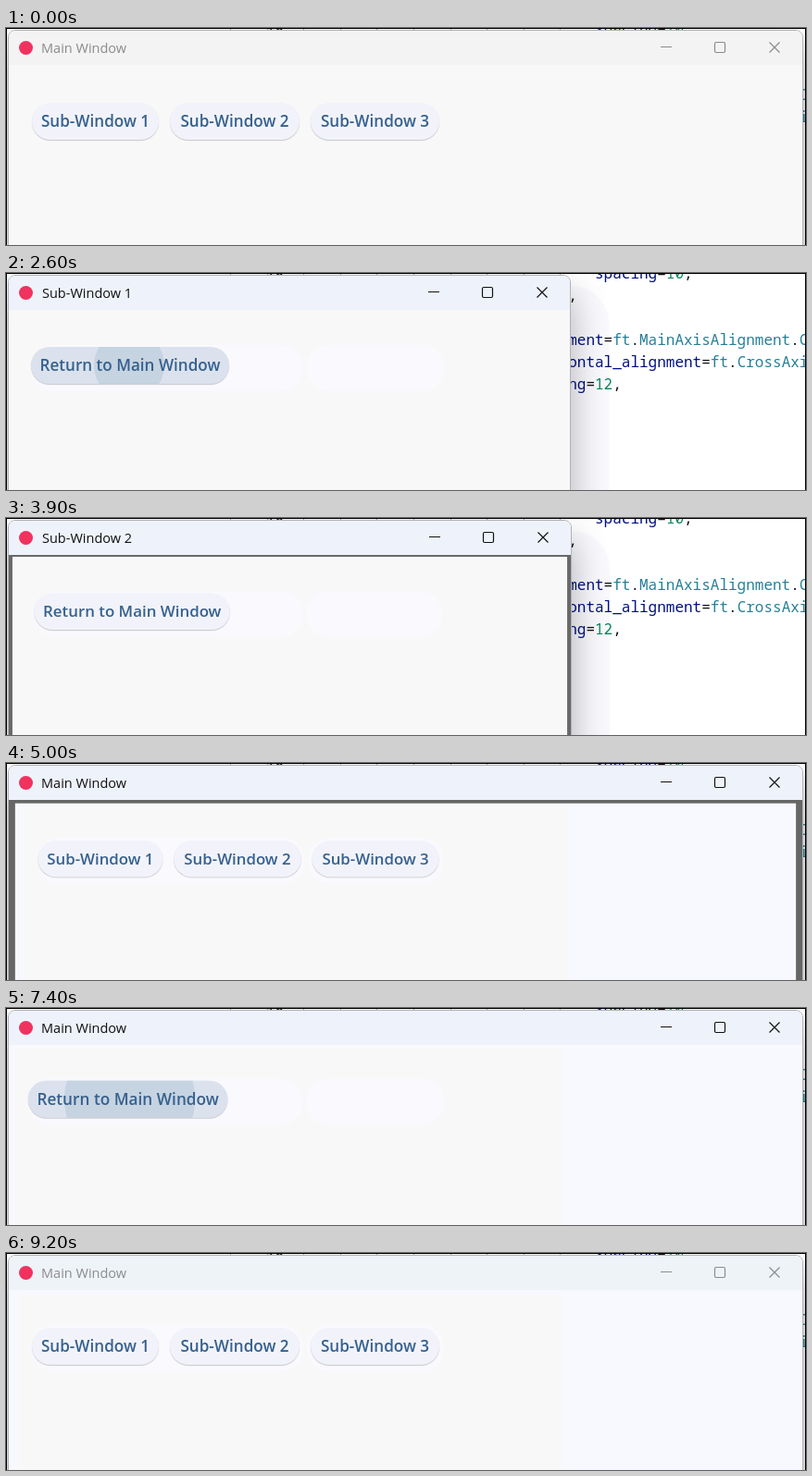
These frames come from a looping animation (864x235 px, 9.3 s). An HTML page:

```html
<!DOCTYPE html>
<html lang="en">
<head>
<meta charset="utf-8">
<title>Window navigation</title>
<style>
  html, body { margin: 0; width: 100%; height: 100%; overflow: hidden; }
  #stage { position: relative; width: 864px; height: 235px; overflow: hidden; background: #fff; }
  #stage * { position: absolute; box-sizing: border-box; white-space: pre; }
  #stage .edge { inset: 0; border: solid #000; border-width: 1px 1px 0; }

  .code { left: 607.2px; font: 16px/24px "Noto Sans Mono", monospace; color: #111; }
  #stage .code * { position: static; }
  .code b { font-weight: 400; color: #001080; }
  .code i { font-style: normal; color: #267f99; }
  .code u { text-decoration: none; color: #098658; }
  .guides { left: 242px; top: 1px; width: 360px; height: 1px;
    background: repeating-linear-gradient(90deg, #aaa 0 1px, transparent 1px 39.6px); }

  #halo { top: 14px; height: 420px; border-radius: 40px; background: #fafafe; }
  #win { left: 2px; top: 2px; height: 420px; border: 1px solid #b2b3b6; border-radius: 8px;
    overflow: hidden; box-shadow: 0 20px 40px rgba(0, 0, 0, .3); }
  #bar { inset: 0 0 auto; height: 37px; }
  .logo { left: 11px; top: 11px; width: 15px; height: 15px; border-radius: 50%; background: #f0325f; }
  #title { top: 0; font: 14.5px/37px "Open Sans", sans-serif; }
  #controls { right: 0; top: 0; }
  #view { inset: 37px 0 0; overflow: hidden; }
  #page { inset: 0; overflow: hidden; }
  #patch { left: 10px; top: 5px; height: 400px; background: #f8f8f8; }
  .ghost { top: 38px; height: 50px; border-radius: 24px; background: #f9f9fe; }

  .btn { height: 40px; border-radius: 20px; overflow: hidden; background: #f2f3fa; color: #36618e;
    text-align: center; font: 600 17.1px/40px "Open Sans", sans-serif;
    box-shadow: 0 1px 1px rgba(0, 0, 0, .2); }
  .btn .heat { inset: 0; background: #36618e; }
  .btn .ripple { border-radius: 50%; background: rgba(54, 97, 142, .12); }
  .btn .label { inset: 0; }
</style>
</head>
<body>
<div id="stage">
  <div id="halo"></div>
  <div class="code" style="left:281px;top:-15px">10</div>
  <div class="code" style="left:636px;top:-12px"><b>spacing</b>=<u>10</u>,</div>
  <div class="code" style="top:12px">,</div>
  <div class="code" style="top:60px"><b>ment</b>=<i>ft</i>.<i>MainAxisAlignment</i>.<i>C</i></div>
  <div class="code" style="top:84px"><b>ontal_alignment</b>=<i>ft</i>.<i>CrossAxi</i></div>
  <div class="code" style="top:108px"><b>ng</b>=<u>12</u>,</div>
  <div class="guides"></div>
  <div id="win">
    <div id="bar">
      <div class="logo"></div>
      <div id="title"></div>
      <svg id="controls" width="174" height="37" fill="none" stroke="currentColor" stroke-width="1.2">
        <rect id="close" x="116" width="58" height="36" fill="#c42b1c" stroke="none"/>
        <path d="M21 17.5h12"/>
        <rect x="79.5" y="12.5" width="11" height="11" rx="1.5"/>
        <path id="cross" d="M138.5 12.5l11 11m0-11l-11 11"/>
      </svg>
    </div>
    <div id="view">
      <div id="page">
        <div id="patch"></div>
        <div class="ghost" style="left:24px;width:294px"></div>
        <div class="ghost" style="left:322px;width:148px"></div>
      </div>
    </div>
  </div>
  <div class="edge"></div>
</div>
<script>
const LOOP = 9300;
const $ = id => document.getElementById(id);
const windows = [
  { title: "Main Window", left: 35, width: 859, centerY: 230 },
  { title: "Sub-Window 1", left: 36, width: 608, centerY: 155 },
  { title: "Sub-Window 2", left: 36, width: 609, centerY: 155 },
  { title: "Sub-Window 3", left: 36, width: 609, centerY: 155 }
];

function makeButton(text, x, y, width) {
  const el = document.createElement("div");
  el.className = "btn";
  el.style.cssText = `left:${x}px;top:${y}px;width:${width}px`;
  const [heat, ripple, label] = ["heat", "ripple", "label"].map(name => {
    const part = document.createElement("div");
    part.className = name;
    return el.appendChild(part);
  });
  label.textContent = text;
  $("page").append(el);
  return { el, heat, ripple, x };
}

// Index 0 is the return button, 1 to 3 open the sub-windows.
const buttons = [
  makeButton("Return to Main Window", 24, 40, 214),
  makeButton("Sub-Window 1", 25, 41, 137),
  makeButton("Sub-Window 2", 174, 41, 140),
  makeButton("Sub-Window 3", 326, 41, 139)
];

// Press, window resize, then the new page zooms in over a dark scrim.
const navigate = (t, win, hot, x, zoom, scrim) => [
  [t, { hot, heat: 1, ripple: 38, x }],
  [t + 100, { win, ripple: 70, zoom: 1.008, visited: true }],
  [t + 200, { page: win, hot: -1, ripple: 0, zoom, scrim }],
  [t + 300, { zoom: 1 - (1 - zoom) / 4, scrim: "#646464" }],
  [t + 400, { zoom: 1 }]
];
const hover = (t, hot, heat = 1) => [t, { hot, heat }];

const steps = [
  [0, { win: 0, page: 0, hot: -1, heat: 0, ripple: 0, x: 0, zoom: 1, scrim: "#646464",
        active: false, visited: false, red: 0, patch: 596 }],
  hover(600, 2, .5), hover(700, 1, .4), hover(800, 1, .8), hover(900, 1),
  [1200, { active: true }],
  ...navigate(1300, 1, 1, 130, .985, "#6a6a6a"),
  ...navigate(2600, 0, 0, 130, .984, "#666"),
  hover(3000, 1), hover(3200, 2, .5), hover(3300, 2),
  ...navigate(3700, 2, 2, 244, .987, "#696969"),
  hover(4300, 0, .5), hover(4400, 0),
  ...navigate(4800, 0, 0, 170, .984, "#666"),
  hover(5200, 1), hover(5300, 2, .5), hover(5400, 2), hover(5500, 3, .4),
  hover(5600, 3, .8), hover(5700, 3),
  ...navigate(6000, 3, 3, 390, .967, "#a8a8aa"),
  [6400, { patch: 587 }],
  hover(6800, 0),
  ...navigate(7300, 0, 0, 133, .984, "#666"),
  hover(7700, 1), hover(7800, 2), hover(7900, 2, .4), hover(8000, -1),
  [8300, { red: .25 }], [8400, { red: .6 }], [8500, { red: .85 }], [8600, { red: 1 }],
  [8800, { red: .4 }], [8900, { red: 0 }],
  [9200, { active: false }]
];

function stateAt(t) {
  return Object.assign({}, ...steps.filter(([start]) => start <= t).map(([, change]) => change));
}

function draw(s) {
  const win = windows[s.win];
  const wide = s.win === 0;
  $("win").style.width = win.width + "px";
  $("halo").style.width = win.width + 43 + "px";
  $("title").textContent = win.title;
  $("title").style.left = win.left + "px";
  $("bar").style.color = s.active ? "#111" : "#8b8b8d";
  $("bar").style.background = s.active ? "#eef2fa" : s.visited ? "#eef3f8" : "#f3f3f3";
  $("close").style.opacity = s.red;
  $("cross").style.stroke = s.red > .5 ? "#fff" : "currentColor";

  $("view").style.background = s.scrim;
  const page = $("page").style;
  page.background = wide && s.visited ? "#f8f9ff" : "#f8f8f8";
  page.transformOrigin = `50% ${win.centerY}px`;
  page.transform = s.zoom === 1 ? "none" : `scale(${s.zoom})`;
  $("patch").style.width = s.patch + "px";
  for (const ghost of document.querySelectorAll(".ghost"))
    ghost.style.display = s.visited ? "block" : "none";

  buttons.forEach((b, i) => {
    const hot = i === s.hot;
    const r = hot ? s.ripple : 0;
    b.el.style.display = (i === 0) === (s.page !== 0) ? "block" : "none";
    b.heat.style.opacity = hot ? .12 * s.heat : 0;
    b.ripple.style.cssText =
      `left:${s.x - b.x - r}px;top:${20 - r}px;width:${2 * r}px;height:${2 * r}px`;
  });
}

let shown = -1;
function tick() {
  const t = performance.now() % LOOP;
  const index = steps.filter(([start]) => start <= t).length;
  if (index !== shown) {
    shown = index;
    draw(stateAt(t));
  }
  requestAnimationFrame(tick);
}
tick();
</script>
</body>
</html>
```
